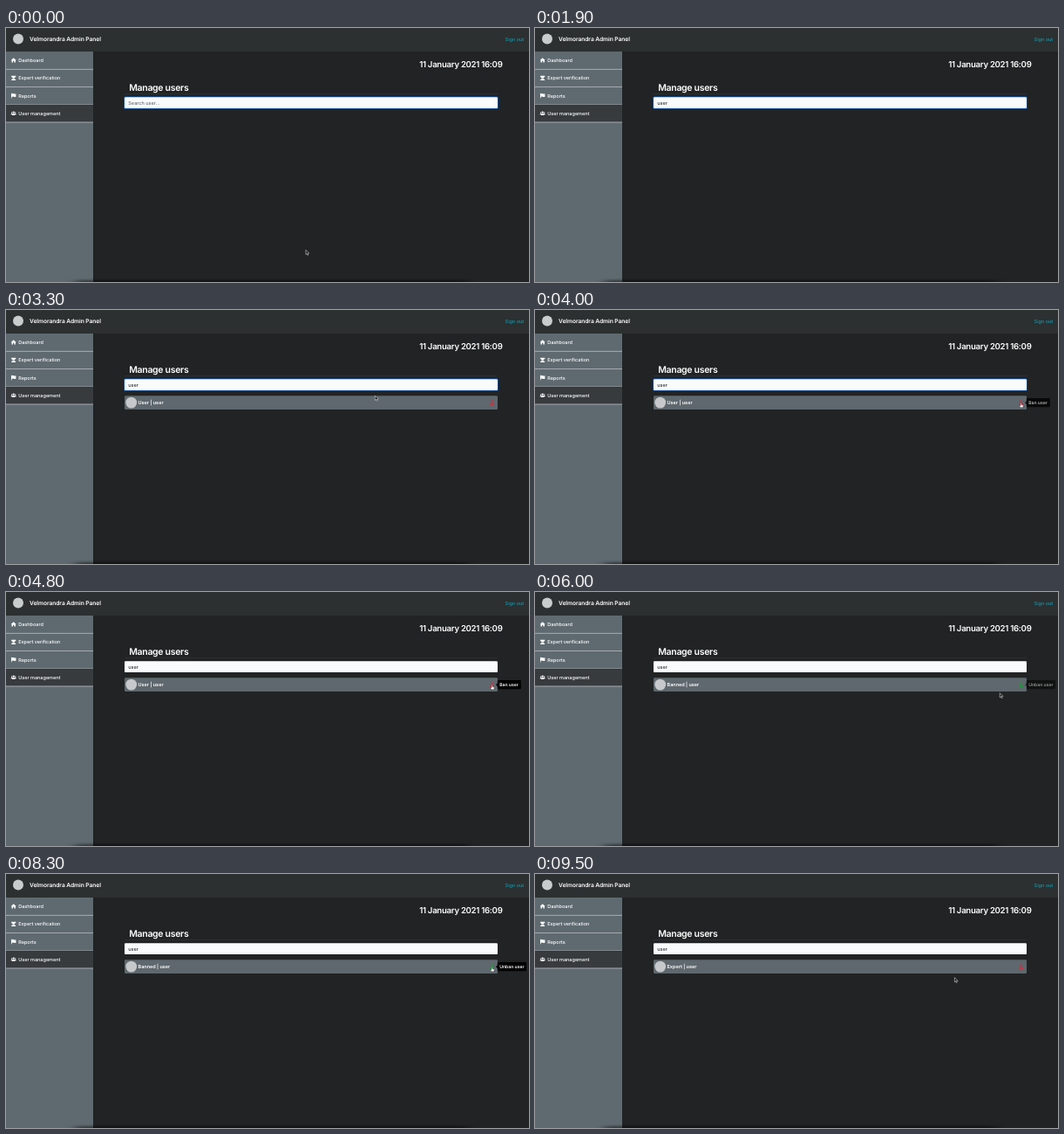
An HTML page for the animation above (9800 ms loop, 600 px wide and 291 px high).

```html
<!DOCTYPE html>
<html lang="en">
<head>
<meta charset="utf-8">
<title>Manage users</title>
<style>
  html, body { margin: 0; width: 100%; height: 100%; overflow: hidden; background: #212324; }
  svg { display: block; width: 100vw; height: 100vh; }
  text {
    font: 500 5.5px Inter, "Noto Sans", sans-serif;
    text-rendering: geometricPrecision;
    fill: #fff;
    white-space: pre;
  }
  .brand { font-size: 6.7px; font-weight: 600; letter-spacing: -.01em; }
  .date { font-size: 9.6px; font-weight: 600; letter-spacing: -.03em; }
  .title { font-size: 10.5px; font-weight: 600; letter-spacing: -.03em; }
  .link { fill: #1796aa; }
  .name { font-weight: 600; }
  .tip { font-size: 5.1px; }
</style>
</head>
<body>
<svg viewBox="0 0 600 291" preserveAspectRatio="none">
  <defs>
    <filter id="soft" x="-10%" y="-300%" width="120%" height="700%"><feGaussianBlur stdDeviation="6 1.5"/></filter>
  </defs>
  <rect width="600" height="291" fill="#212324"/>
  <rect y="27" width="100" height="264" fill="#5f6a70"/>
  <rect width="600" height="27" fill="#2c3031"/>
  <circle cx="14" cy="12.5" r="6" fill="#c9cccd"/>
  <text class="brand" x="27" y="15.4">Velmorandra Admin Panel</text>
  <text class="link" x="572.6" y="15.2">Sign out</text>
  <g id="menu"></g>
  <text class="date" x="569.5" y="44.8" text-anchor="end">11 January 2021 16:09</text>
  <text class="title" x="141.2" y="71.7">Manage users</text>
  <rect x="136" y="75.5" width="428" height=".6" fill="#3b3a3c"/>

  <rect id="ring" x="135" y="78.3" width="430" height="14.8" rx="1.8" fill="#0c4a94"/>
  <rect x="136" y="79.3" width="428" height="12.8" rx="1.2" fill="#fafbfc"/>
  <text id="query" x="140.3" y="87.8"></text>
  <rect id="caret" y="82.5" width=".6" height="6.5" fill="#222"/>

  <g id="row">
    <rect x="136" y="98.3" width="428" height="15.6" rx="1.2" fill="#5f686e"/>
    <circle cx="143.7" cy="106.1" r="6.4" fill="#c6c8c9"/>
    <text id="name" class="name" x="151.5" y="108.2"></text>
    <g id="action">
      <circle cx="557.6" cy="104.8" r="1.4"/>
      <path d="M555.3 108.8v-.6q0-1.6 1.6-1.6h1.4q1.6 0 1.6 1.6v.6z"/>
    </g>
  </g>
  <g id="tooltip">
    <path d="M562 106.2l2-2v4z"/>
    <rect id="tipBox" x="563.8" y="101.1" height="10.2" rx="1"/>
    <text id="tipText" class="tip" x="566.2" y="108"></text>
  </g>

  <rect x="80" y="289" width="450" height="4" opacity=".5" filter="url(#soft)"/>
  <g id="pointer">
    <path id="arrow" d="M0 0v5.2l1.2-1.1.8 1.9.9-.4-.8-1.8h1.6z" fill="#111" stroke="#e8e8e8" stroke-width=".55"/>
    <path id="beam" d="M-1.2 -3h2.4M0 -3v6M-1.2 3h2.4" fill="none" stroke="#222" stroke-width=".6"/>
    <path id="hand" d="M-.5 0q.6-.6 1 0v1.8l1.8.5q.5.2.4.8l-.4 1.9h-2.8l-1.5-2q0-.8.8-.4l.7.5z" fill="#fff" stroke="#222" stroke-width=".4"/>
  </g>
</svg>
<script>
const LOOP = 9800, STEP = 100;
const TYPE = 1000, RESULT = 2400, PRESS = 4700, BAN = 4900, UNBAN = 8700;
const $ = id => document.getElementById(id);

const home = "M-3 0L0-2.7 3 0h-.8v2.5H.7V.8H-.7v1.7h-1.5V0z";
const expert = "M-2.6-2.4h5.2v1.3h-.9q0 1.7-1.7 1.7t-1.7-1.7h-.9zM-2.6 2.7q0-1.8 1.6-1.8h2q1.6 0 1.6 1.8z";
const flag = "M-2.7-2.7h.7v.5q1.2-.6 2.4 0t2.3 0v3.4q-1.2.6-2.3 0t-2.4 0v1.6h-.7z";
const person = (x, s) => `M${x - s} ${-s}a${s} ${s} 0 10${2 * s} 0 ${s} ${s} 0 10${-2 * s} 0` +
  `M${x - 1.6 * s} ${2 * s}q0 ${-1.7 * s} ${1.6 * s} ${-1.7 * s}t${1.6 * s} ${1.7 * s}z`;
const group = person(-2, .7) + person(2, .7) + person(0, 1.1);

const items = { "Dashboard": home, "Expert verification": expert, "Reports": flag, "User management": group };
$("menu").innerHTML = Object.entries(items).map(([label, icon], i) => `
  <g transform="translate(0 ${27 + i * 20.25})">
    ${label === "User management" ? '<rect width="100" height="20" fill="#373b3e"/>' : ""}
    <rect y="19.9" width="100" height=".7" fill="#c3c7c9"/>
    <path d="${icon}" fill="#fff" transform="translate(8.7 10)"/>
    <text x="14.2" y="12">${label}</text>
  </g>`).join("");

const origin = { x: 344, y: 254.3 }, field = { x: 176.5, y: 82.3 }, action = { x: 557.5, y: 106.8 };
const moves = [
  { from: 100, to: 500, goal: field },
  { from: RESULT, to: 3900, goal: action },
  { from: 5800, to: 6300, goal: { x: 488.6, y: 132 } },
  { from: 7500, to: 8100, goal: action },
  { from: 8900, to: 9500, goal: { x: 481.4, y: 118.6 } }
];

const ramp = (t, from, to) => Math.min(1, Math.max(0, (t - from) / (to - from)));
const smooth = u => u * u * (3 - 2 * u);
const within = (v, from, to) => v >= from && v < to;
const show = (id, on) => { $(id).style.display = on ? "" : "none"; };

const pointerAt = t => moves.reduce((p, { from, to, goal }) => {
  const u = smooth(ramp(t, from, to));
  return { x: p.x + (goal.x - p.x) * u, y: p.y + (goal.y - p.y) * u };
}, origin);

// The tooltip fades in on arrival at the action icon and out on departure.
const tipOpacity = t => moves.reduce((opacity, { to, goal }, i) => {
  if (goal !== action) return opacity;
  const leave = moves[i + 1].from;
  return opacity + ramp(t, to - 200, to + 200) - ramp(t, leave, leave + 400);
}, 0);

function draw(now) {
  const t = Math.floor((now % LOOP) / STEP) * STEP;
  const banned = within(t, BAN, UNBAN);

  const typed = "user".slice(0, Math.max(0, (t - TYPE) / STEP));
  $("query").textContent = typed || "Search user...";
  $("query").style.fill = typed ? "#303438" : "#646c74";
  $("caret").setAttribute("x", 140.3 + typed.length * 2.95);
  show("caret", within(t, 700, PRESS) && (t < 1400 || (t - 1400) % 1000 < 500));
  show("ring", t < PRESS);

  show("row", t >= RESULT);
  $("name").textContent = (t < BAN ? "User" : banned ? "Banned" : "Expert") + " | user";
  $("action").style.fill = banned ? "#1c9a35" : "#cf303f";

  $("tooltip").style.opacity = tipOpacity(t);
  $("tipText").textContent = banned ? "Unban user" : "Ban user";
  $("tipText").style.fontWeight = t < PRESS ? 500 : 600;
  $("tipBox").setAttribute("width", banned ? 33.2 : 27);

  const { x, y } = pointerAt(t);
  const overInput = within(x, 136, 564) && within(y, 79, 93);
  const overAction = Math.hypot(x - action.x, y - action.y) < 3;
  $("pointer").setAttribute("transform", `translate(${x} ${y})`);
  show("pointer", !within(t, TYPE + STEP, RESULT));
  show("beam", overInput);
  show("hand", overAction);
  show("arrow", !overInput && !overAction);
}

const start = performance.now();
(function frame() {
  draw(performance.now() - start);
  requestAnimationFrame(frame);
})();
</script>
</body>
</html>
```
